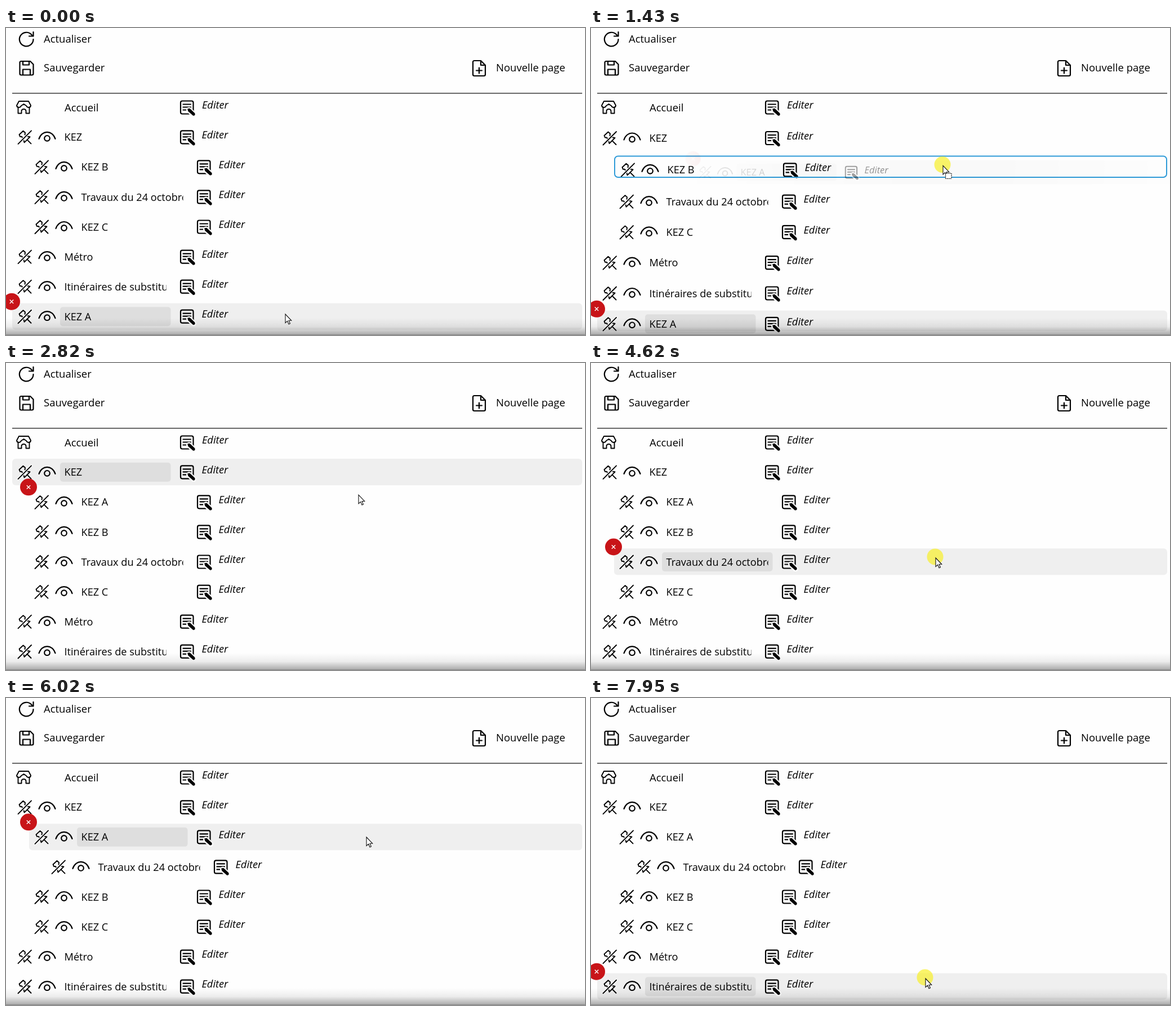
Write an HTML page that moves like this. It is 1028 px wide and 545 px high and loops after 8000 ms.

```html
<!DOCTYPE html>
<html lang="fr">
<head>
<meta charset="utf-8">
<title>Menu des pages</title>
<style>
  html, body { margin: 0; width: 100%; height: 100%; overflow: hidden; background: #fefefe; }
  svg { display: block; width: 1028px; height: 545px; }
  text { font: 18.5px "Open Sans", "Noto Sans", sans-serif; fill: #000; }
  .label { font-size: 18.15px; }
  .edit { font-style: italic; font-size: 18.3px; }
  .icon { fill: none; stroke: #000; stroke-width: 2.2; stroke-linecap: round; stroke-linejoin: round; }
  .thin { stroke-width: 1.9; }
</style>
</head>
<body>
<svg viewBox="0 0 1028 545" xmlns="http://www.w3.org/2000/svg">
  <defs>
    <g id="pin" class="icon thin">
      <path d="M-9.500-4.500L-2.500-11L1-8L.5-4.500L4-1.500L9.500-.5L-.5 9.500L-2 4L-5-1L-8-1Z M5 5L11.500 11.500"/>
      <path d="M-11 11.500L12-11.500" style="stroke:#fefefe;stroke-width:4.500"/>
      <path d="M-11.500 12L12-11.500"/>
    </g>
    <g id="eye" class="icon">
      <path d="M-14.500 3C-9.500-13 9.500-13 14.500 3"/>
      <circle cy="2" r="4.800"/>
    </g>
    <g id="note">
      <rect class="icon" x="-11" y="-11.500" width="22.500" height="23" rx="3"/>
      <path class="icon" d="M-6.500-5.500H7M-6.500-.5H7M-6.500 4.500H0"/>
      <path d="M4 4.500L12 12.500" stroke="#fefefe" stroke-width="10" stroke-linecap="round"/>
      <path d="M2 3L5 2.500L13.500 10.500Q15 14 11.500 14L3 6.500Z" stroke="#000" stroke-width="1.500" stroke-linejoin="round"/>
    </g>
    <g id="badge">
      <circle r="15" fill="#c81418"/>
      <path d="M-3.200-3.200L3.200 3.200M3.200-3.200L-3.200 3.200" stroke="#fff" stroke-width="1.400"/>
    </g>
    <path id="arrow" d="M0 0V15.500L3.600 12.200L6 17.800L8.400 16.800L6 11.300H10.700Z" fill="#fff" stroke="#111" stroke-width="1.100"/>
    <clipPath id="field"><rect x="102" y="-18" width="182.500" height="36"/></clipPath>
    <radialGradient id="glow" gradientUnits="userSpaceOnUse" r="480">
      <stop offset="0" stop-color="#fff" stop-opacity=".56"/>
      <stop offset="1" stop-color="#fff" stop-opacity="0"/>
    </radialGradient>
    <mask id="fade" maskUnits="userSpaceOnUse" x="0" y="0" width="1028" height="545">
      <rect width="1028" height="545" fill="url(#glow)"/>
    </mask>
    <linearGradient id="shade" x1="0" y1="0" x2="0" y2="1">
      <stop offset="0" stop-opacity="0"/>
      <stop offset=".5" stop-opacity=".07"/>
      <stop offset="1" stop-opacity=".34"/>
    </linearGradient>
  </defs>

  <rect width="1028" height="545" fill="#fefefe"/>
  <g class="icon">
    <path d="M48.500 20A12.300 12.300 0 1 1 45.500 12L48 14.500M48.500 7V14.500H41"/>
    <path d="M27 59H43L48.500 64.500V81Q48.500 83.500 46 83.500H27Q24.500 83.500 24.500 81V61.500Q24.500 59 27 59ZM30 59V65.500H41V59M30 83.500V73.500H43V83.500"/>
    <path d="M831.500 58H843L851 66V82.500Q851 85 848.500 85H831.500Q829 85 829 82.500V60.500Q829 58 831.500 58ZM843 58V66H851M840 70.500V80.500M835 75.500H845"/>
  </g>
  <path class="icon thin" d="M23 130H40L44 137.500Q43.500 141 40.500 141Q37 141 36 138L31.500 135L27 138Q26 141 22.500 141Q19.500 141 19 137.500ZM21.500 141V151.500H27.500V147Q28 144 31.500 144Q35 144 35.500 147V151.500H41.500V141"/>
  <text x="67" y="26">Actualiser</text>
  <text x="67" y="77">Sauvegarder</text>
  <text x="870" y="77">Nouvelle page</text>
  <rect x="11" y="115" width="1012" height="1.600" fill="#444"/>
  <text x="104" y="147.500">Accueil</text>
  <use href="#note" x="321" y="141"/>
  <text class="edit" x="348" y="143">Editer</text>

  <g id="list"></g>
  <rect y="515" width="1028" height="30" fill="url(#shade)"/>
  <rect y="544" width="1028" height="1" fill="#888"/>
  <g id="top"></g>
</svg>
<script>
const LOOP = 8000;
const BLUE = '#2f9bd8';
const byId = id => document.getElementById(id);

const labels = {
  main: 'KEZ', a: 'KEZ A', b: 'KEZ B', c: 'KEZ C',
  works: 'Travaux du 24 octobre', metro: 'Métro', routes: 'Itinéraires de substitution'
};

// Each entry is key:depth.
const parse = s => s.split(' ').map(e => ({ key: e.split(':')[0], depth: +e.split(':')[1] }));
const orders = [
  { from: 0, rows: parse('main:0 b:1 works:1 c:1 metro:0 routes:0 a:0') },
  { from: 2400, rows: parse('main:0 a:1 b:1 works:1 c:1 metro:0 routes:0') },
  { from: 6020, rows: parse('main:0 a:1 works:2 b:1 c:1 metro:0 routes:0') }
];
const drags = [
  { from: 490, to: 2400, key: 'a', x: 502, dy: -13 },
  { from: 4830, to: 6020, key: 'works', x: 612, dy: -10 }
];
const presses = [[280, 2400], [4620, 6020], [7810, LOOP]];

// Pointer way points: time, x, y.
const path = [
  [0, 496, 508], [280, 496, 508], [350, 502, 498], [490, 502, 498], [830, 570, 421],
  [1430, 625, 244.5], [1920, 628, 217], [2400, 628, 217], [2770, 627, 217],
  [2820, 626, 234], [3640, 612, 346], [4830, 612, 346], [5170, 638, 272],
  [5390, 640, 247], [6020, 640, 247], [6240, 638, 270], [6500, 627, 350],
  [7190, 594, 498], [LOOP, 594, 498]
];

// Monotone cubic interpolation, so pauses stay still and nothing overshoots.
function along(t, axis) {
  const slope = i => i < 0 || i > path.length - 2 ? 0
    : (path[i + 1][axis] - path[i][axis]) / (path[i + 1][0] - path[i][0]);
  const tangent = i => {
    const p = slope(i - 1), q = slope(i);
    return p * q <= 0 ? 0 : 2 * p * q / (p + q);
  };
  let i = 0;
  while (i < path.length - 2 && path[i + 1][0] <= t) i++;
  const h = path[i + 1][0] - path[i][0], u = (t - path[i][0]) / h;
  const ease = u * u * (3 - 2 * u);
  return path[i][axis] + (path[i + 1][axis] - path[i][axis]) * ease
    + h * u * (1 - u) * ((1 - u) * tangent(i) - u * tangent(i + 1));
}

const orderAt = t => orders.filter(o => o.from <= t).pop();
const dragAt = t => drags.find(d => t >= d.from && t < d.to);
const restY = i => 193.8 + 53.07 * i;
const dragY = i => 195.5 + 54.3 * i;

function hoverAt(t) {
  const drag = dragAt(t);
  if (drag) return drag.key;
  const y = along(t, 2);
  const row = orderAt(t).rows.find((r, i) => Math.abs(y - restY(i)) <= 23.7);
  return row && row.key;
}

// Share of a short, slightly delayed window spent over the row.
function hoverAlpha(key, t) {
  const start = orderAt(t).from, n = 23;
  let hits = 0;
  for (let i = 0; i < n; i++) {
    if (hoverAt(Math.max(start, t - 60 - i * 10)) === key) hits++;
  }
  return hits / n;
}

function targetAt(t, rows, drag) {
  const y = along(Math.max(drag.from, t - 25), 2);
  for (let i = 0; i < rows.length; i++) {
    const d = y - dragY(i);
    if (d >= -24 && d < 12.5 && rows[i].key !== drag.key) return { index: i, box: true };
    if (d >= 12.5 && d < 30.3) return { index: i, box: false };
  }
  return { index: -1 };
}

function rowMarkup(row, y, alpha, height, badge, dx = 0) {
  const inset = 30 * row.depth;
  const back = alpha ? `<g opacity="${alpha}">
    <rect x="11" y="-23.700" width="${1012 - inset}" height="${height}" rx="6" fill-opacity=".06"/>
    <rect x="96" y="-17" width="196.500" height="34" rx="5" fill-opacity=".07"/></g>` : '';
  return `<g transform="translate(${inset + dx} ${y})">${back}
    <use href="#pin" x="33"/><use href="#eye" x="73"/>
    <g clip-path="url(#field)"><text class="label" x="103.500" y="6.600">${labels[row.key]}</text></g>
    <use href="#note" x="321"/><text class="edit" x="347.500" y="2.200">Editer</text>
    ${badge ? '<use href="#badge" x="10" y="-26.500"/>' : ''}</g>`;
}

function ghostMarkup(row, drag, x, y) {
  const scale = 913 / (1012 - 30 * row.depth);
  return `<g mask="url(#fade)"><g transform="translate(${x - scale * drag.x} ${y - scale * drag.dy}) scale(${scale})">
    ${rowMarkup(row, 0, 0.7, 47, true)}</g></g>`;
}

function draw(t) {
  const { rows } = orderAt(t), drag = dragAt(t), hover = hoverAt(t);
  const x = along(t, 1), y = along(t, 2);
  const target = drag ? targetAt(t, rows, drag) : { index: -1 };
  let list = '', marker = '', top = '';

  rows.forEach((row, i) => {
    const hit = target.index === i;
    const push = target.box ? (hit ? 2 : i > target.index ? 4 : 0) : 0;
    const cy = drag ? dragY(i) + push : restY(i);
    const alpha = drag ? +(row.key === drag.key) : hoverAlpha(row.key, t);
    list += rowMarkup(row, cy, alpha, drag ? 36.5 : 47, row.key === hover, hit && target.box ? 2 : 0);
    if (!hit) return;
    if (target.box) {
      const left = 12 + 30 * row.depth;
      marker = `<rect x="${left}" y="${cy - 24.3}" width="${1022 - left}" height="37.500" rx="6" fill="none" stroke="${BLUE}" stroke-width="2"/>`;
    } else {
      const next = rows[i + 1];
      const depth = next ? Math.max(row.depth, next.depth) : row.depth;
      marker = `<path d="M${20 + 30 * depth} ${cy + 21.7}H1013" stroke="${BLUE}" stroke-width="6.400" stroke-linecap="round"/>`;
    }
  });

  if (drag) {
    byId('glow').setAttribute('cx', x);
    byId('glow').setAttribute('cy', y);
    top += ghostMarkup(rows.find(r => r.key === drag.key), drag, x, y);
  }
  if (presses.some(([from, to]) => t >= from && t < to)) {
    top += `<circle cx="${x - 1}" cy="${y - 2}" r="14.500" fill="#f8f02a" fill-opacity=".7"/>`;
  }
  top += `<use href="#arrow" x="${x}" y="${y}"/>`;
  if (drag) {
    top += `<rect x="${x + 4.5}" y="${y + 13.5}" width="10.500" height="9.500" rx="1" fill="#fff" stroke="#111" stroke-width="1.200" stroke-dasharray="2 1"/>`;
  }
  byId('list').innerHTML = list + marker;
  byId('top').innerHTML = top;
}

const start = performance.now();
function tick() {
  draw((performance.now() - start) % LOOP);
  requestAnimationFrame(tick);
}
tick();
</script>
</body>
</html>
```
